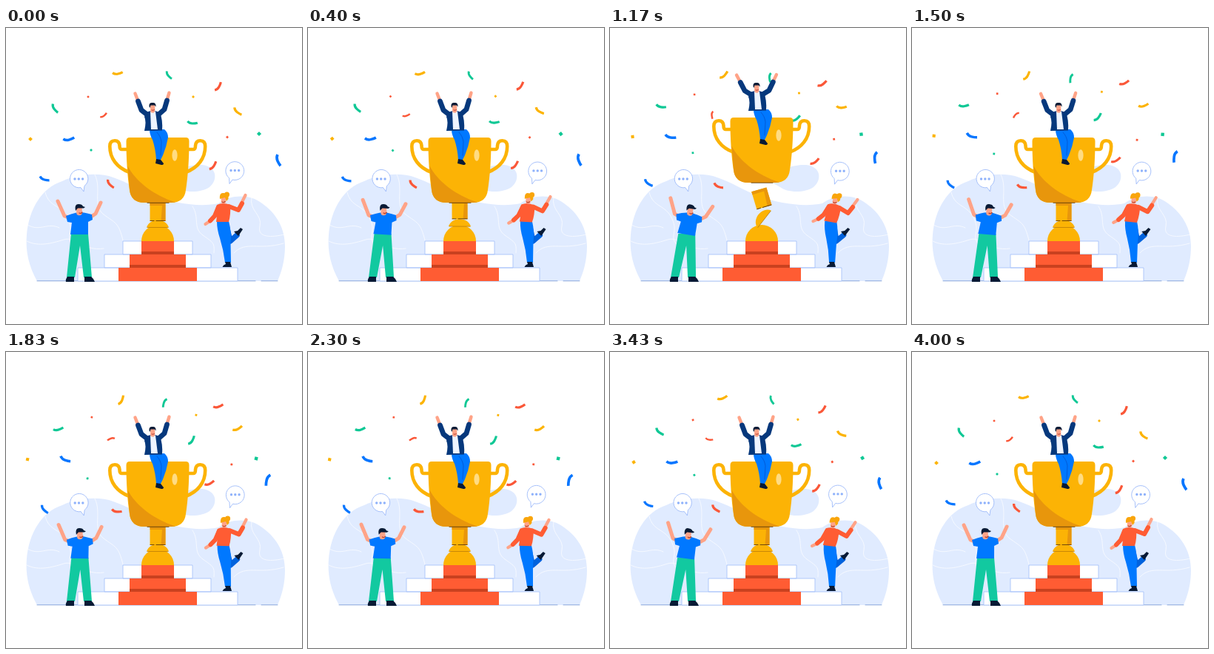
An HTML page for the animation above (4.06 s loop, 400 by 400 pixels).

```html
<!DOCTYPE html>
<html lang="en">
<head>
<meta charset="utf-8">
<title>Winner's cup</title>
<style>
html, body { margin: 0; width: 100%; height: 100%; overflow: hidden; background: #fff; }
svg { display: block; width: 100vw; height: 100vh; }
.line { fill: none; stroke-linecap: round; stroke-linejoin: round; }
.skin { stroke: #ffa387; }
.blue { fill: #0078ff; }
.ink { fill: #081a35; }
.gold { fill: #fcb305; }
.shade { fill: #e8960c; }
.step { fill: #fff; stroke: #a9c3fa; stroke-width: .9; }
.red { fill: #ff5c33; }
.deep { fill: #c9411f; }
</style>
</head>
<body>
<svg viewBox="0 0 400 400">
  <!-- backdrop -->
  <g fill="#e0ebff">
    <path d="M42 342C31 322 26 302 28 279C31 245 48 216 76 207C97 197 126 195 145 202C165 209 178 218 200 227C230 238 264 242 287 237C304 225 329 224 346 237C366 251 377 271 377 295C377 315 372 330 367 342Z"/>
    <path d="M220 205C228 190 250 184 265 185C285 187 287 205 275 215C262 224 238 222 230 215C224 211 217 210 220 205Z"/>
  </g>
  <g class="line" stroke="#fff" stroke-width=".9" opacity=".75">
    <path d="M28 288C44 296 62 291 78 286S104 302 132 298M53 222C58 243 75 238 84 258S78 282 92 294M120 198C130 218 116 240 132 252S152 262 158 287M29 266C46 276 56 262 72 270"/>
    <path d="M332 229C328 247 347 252 343 268S360 283 376 279M308 304C324 287 341 301 375 291M252 241C262 256 252 270 266 280S282 290 281 304"/>
  </g>
  <path class="line" d="M42 341.800H337M345 341.800H367" stroke="#6288cc" stroke-width=".7"/>

  <!-- podium -->
  <path class="step" d="M158 288H252V306H158ZM133 306H277V324H133ZM97 324H313V342H97Z"/>
  <path class="red" d="M183 288H227V306H183ZM167 306H243V324H167ZM152 324H258V342H152Z"/>
  <path class="deep" d="M183 302H227V306H183ZM167 320H243V324H167Z"/>

  <g id="confetti"></g>

  <!-- cup -->
  <path class="gold" d="M183 288A22 22 0 0 1 227 288Z"/>
  <g id="knob">
    <path class="gold" d="M190 269.500C194 256 216 256 220 269.500Z"/>
    <path class="line" d="M191 269.500H219" stroke="#b47408" stroke-width=".7"/>
  </g>
  <g id="neck">
    <path class="gold" d="M194.500 236H215.500V261H194.500Z"/>
    <path class="shade" d="M194.500 236H215.500V240H194.500ZM211 240H215.500V261H209.500Z"/>
    <path class="line" d="M195 260.500H200M203 260.500H215" stroke="#5f3c0a" stroke-width=".9"/>
  </g>
  <g id="cup">
    <g class="line" stroke="#fcb305" stroke-width="4.600">
      <path id="ear" d="M164 164H156Q153.500 164 153.500 159Q153 152.300 147 152.300Q140.300 152.300 140.300 160C140.300 176 150 189 167 195"/>
      <use href="#ear" transform="matrix(-1 0 0 1 409.500 0)"/>
    </g>
    <path class="gold" d="M167 148H243Q247.500 148 247.500 153C247.500 176 246 200 243 219Q241 236 223 236H187Q169 236 167 219C164 200 162.500 176 162.500 153Q162.500 148 167 148Z"/>
    <path class="shade" d="M164.300 186C174 206 199 226 229 235.500L223 236H187Q169 236 167 219Z"/>
    <ellipse cx="228" cy="172" rx="3.600" ry="7.800" fill="#ffdc83"/>
    <path class="line" d="M191 236.300H220" stroke="#5f3c0a" stroke-width=".9"/>

    <!-- winner -->
    <path class="blue" d="M194 137H214Q219 141 219 148Q217 160 212 172L209 178H203Q202 163 198 151Q194 144 194 137Z"/>
    <path class="line" d="M204 141Q209 146 210 154L209 172" stroke="#0459d2" stroke-width=".9"/>
    <path class="ink" d="M203 177L209 178L213 183Q213 185 210 185L202 183Z"/>
    <g id="armL">
      <path class="line skin" d="M179 100L174.500 88.500" stroke-width="4.400"/>
      <path class="line" d="M192 118L183 111L178.500 99" stroke="#06387c" stroke-width="6.800"/>
    </g>
    <g id="armR">
      <path class="line skin" d="M217 99L220.500 87.500" stroke-width="4.400"/>
      <path class="line" d="M206 117L214 110L217.500 98" stroke="#06387c" stroke-width="6.800"/>
    </g>
    <path d="M189 114Q198 110 208 114Q212 124 211 138.500L187 139Q190 126 187 120Z" fill="#06387c"/>
    <path d="M195 113H202L205 137H196Z" fill="#eef4ff"/>
    <path class="line skin" d="M198.200 106V111.500" stroke-width="6.200"/>
    <path class="ink" d="M193.500 106Q193 100.500 198 101Q203 100.500 202.500 106.500L201 104.500H195.500L194.500 108Z"/>
    <path class="line" d="M197 111Q199 112 200.500 110.500" stroke="#b23a2f" stroke-width="1"/>
  </g>

  <!-- left fan -->
  <g id="fanLegs">
    <path d="M88 278H111L116 337H105L100 294L93 337H82Z" fill="#12c9a0"/>
  </g>
  <path class="ink" d="M83 336H92V343H81Q80 340 83 336ZM106 336H115Q119 339 120 343H106Z"/>
  <g id="fanTop">
    <path class="line skin" d="M87 257L79 254L70 234" stroke-width="5"/>
    <path class="line skin" d="M112 257L121 251L128 236" stroke-width="5"/>
    <path class="blue" d="M88 251.500Q99 247.500 110 250.500L116 252L117 259L111 262L111 279H87L89 263L83 262L81 254Z"/>
    <path class="line skin" d="M99 244.500V249.500" stroke-width="7.600"/>
    <path class="ink" d="M94 247Q92 238 98 238Q103 238 104 241L107 242L105 243.500H97Z"/>
    <path class="line" d="M99 250Q101 251.500 103 249" stroke="#b8452f" stroke-width="1.400"/>
  </g>

  <!-- right fan -->
  <g id="palLegs">
    <path class="line" d="M297 264L303 288L312 280" stroke="#0062dd" stroke-width="7.500"/>
    <path class="blue" d="M285 261H301Q305 276 303.500 290L304 317H296Q294 300 289 284Q285 272 285 261Z"/>
    <path class="ink" d="M308 275L314 281L320 272L317 270L313 274Z"/>
  </g>
  <path class="ink" d="M296 316H303L305 323H292.500Q293.500 320 297 319Z"/>
  <g id="palTop">
    <path class="line skin" d="M277 260L269.500 265M317 239L323.500 226" stroke-width="4.200"/>
    <path class="line" d="M287 242L282 254L276 260.500M301 241L314 246L319 237" stroke="#ff5c33" stroke-width="6"/>
    <path class="red" d="M285 239Q293 235 303 239Q304 252 301 262H284Q286 250 283 245Z"/>
    <path class="line skin" d="M294 230.500V234" stroke-width="6.600"/>
    <g fill="#f9a50b">
      <circle cx="298.500" cy="225" r="3.500"/>
      <path d="M289 231Q288 222 294 223Q301 223 300.500 231L298 234L296 229Q292 230 289 231Z"/>
    </g>
    <path class="line" d="M292 235Q294 236.500 296 234.500" stroke="#b8452f" stroke-width="1.200"/>
  </g>

  <!-- speech bubbles -->
  <g id="talkL">
    <path d="M101 215.600L105 221L106 213.400A12.200 12.200 0 1 0 101 215.600Z" fill="#fff" stroke="#9dbafa" stroke-width=".9"/>
    <path class="line" d="M93 204H93.010M98.300 204H98.310M103.600 204H103.610" stroke="#8fb2fb" stroke-width="3.400"/>
  </g>
  <g id="talkR">
    <path d="M306 205L302 210.500L301.500 202.700A12.400 12.400 0 1 1 306 205Z" fill="#fff" stroke="#9dbafa" stroke-width=".9"/>
    <path class="line" d="M304 192.500H304.010M309.300 192.500H309.310M314.600 192.500H314.610" stroke="#8fb2fb" stroke-width="3.400"/>
  </g>
</svg>
<script>
const LOOP = 4060;
const el = id => document.getElementById(id);
const put = (id, transform) => el(id).setAttribute('transform', transform);
const mix = (a, b, k) => a + (b - a) * k;

const gold = '#fcb302', green = '#10c895', red = '#fa5738', blue = '#0876ff';

// colour, start x y angle, end x y angle, size
const ribbons = [
  [gold, 151, 61, -9, 156, 65, -66],
  [green, 220, 64, 52, 214, 69, 112, .9],
  [red, 287, 79, -58, 287, 73, -18],
  [gold, 313, 113, 40, 313, 103, -29],
  [green, 66, 109, 55, 71, 104, -18],
  [blue, 85, 150, -12, 80, 145, 24, 1.1],
  [red, 132, 118, -37, 142, 117.5, 166, .75],
  [green, 252, 128, 4, 251, 119, -60],
  [blue, 368, 179, 70, 353, 173, 108, 1.15],
  [blue, 52, 204, 18, 52, 213, 48],
  [red, 141, 211, 48, 150, 215, 7],
  [red, 280, 186, -54, 275, 177, -25]
];
// colour, start x y, end x y, size
const dots = [
  [red, 111, 93, 116, 88, 1.6],
  [gold, 253, 93, 257, 85, 1.7],
  [gold, 33, 150, 29, 145, 2.5],
  [green, 342, 143, 338, 144, 2.7],
  [red, 299, 147.5, 305, 152, 1.7],
  [green, 115, 165, 110, 171, 1.7]
];

function addPath(d, attrs) {
  const p = document.createElementNS('http://www.w3.org/2000/svg', 'path');
  p.setAttribute('d', d);
  for (const k in attrs) p.setAttribute(k, attrs[k]);
  el('confetti').append(p);
  return p;
}
const strips = ribbons.map(r => addPath('M-6.800-1.500Q-4 1.300 0 1T6.800-.3',
  { fill: 'none', stroke: r[0], 'stroke-width': 3.2 }));
const bits = dots.map(d => addPath('M0-1.150L1.150 0L0 1.150L-1.150 0Z', { fill: d[0] }));

// height of a toss around its peak time
const toss = (t, peak, half, height) =>
  -height * Math.max(0, 1 - ((t - peak) / half) ** 2);

// eased value from [time, value] steps
function track(t, steps) {
  const i = steps.findIndex(s => s[0] > t);
  if (i < 0) return steps[steps.length - 1][1];
  if (!i) return steps[0][1];
  const [t0, a] = steps[i - 1], [t1, b] = steps[i];
  const k = (t - t0) / (t1 - t0);
  return mix(a, b, k * k * (3 - 2 * k));
}

const neckTurn = [[380, 0], [850, -44], [1400, 0]];
const knobTurn = [[380, 0], [730, 33], [1170, -52], [1400, 0]];
const spread = [[800, 0], [1170, 1], [1600, 0]];

// sway of a body: skewed legs, torso turned about the hip
function lean(name, k, hipX, hipY, footY, shift, turn) {
  const slope = -shift * k / (footY - hipY);
  put(name + 'Legs', `matrix(1 0 ${slope} 1 ${-slope * footY} 0)`);
  put(name + 'Top', `translate(${shift * k} 0) rotate(${turn * k} ${hipX} ${hipY})`);
}

function draw(t) {
  const turn = t / LOOP * 2 * Math.PI;
  const drift = (1 - Math.cos(turn)) / 2;
  const sway = (1 - Math.cos(turn * 2)) / 2;

  ribbons.forEach(([, x, y, a, x2, y2, a2, size = 1], i) =>
    strips[i].setAttribute('transform',
      `translate(${mix(x, x2, drift)} ${mix(y, y2, drift)}) rotate(${mix(a, a2, drift)}) scale(${size})`));
  dots.forEach(([, x, y, x2, y2, size], i) =>
    bits[i].setAttribute('transform',
      `translate(${mix(x, x2, drift)} ${mix(y, y2, drift)}) rotate(${60 * drift}) scale(${size})`));

  put('cup', `translate(0 ${toss(t, 900, 490, 39)})`);
  put('neck', `translate(0 ${toss(t, 860, 480, 31.3)}) rotate(${track(t, neckTurn)} 205 249)`);
  put('knob', `translate(0 ${toss(t, 860, 480, 16.2)}) rotate(${track(t, knobTurn)} 205 265)`);
  const open = track(t, spread);
  put('armL', `rotate(${-7 * open} 191 118)`);
  put('armR', `rotate(${9 * open} 206 117)`);

  lean('fan', sway, 99, 278, 338, 4.5, 10);
  lean('pal', sway, 292, 262, 318, 5.5, 10.5);

  put('talkL', `translate(${.7 * Math.sin(turn)} 0)`);
  put('talkR', `translate(${1.6 * Math.sin(turn)} ${.7 * Math.sin(turn)})`);
}

const start = performance.now();
function tick() {
  draw((performance.now() - start) % LOOP);
  requestAnimationFrame(tick);
}
tick();
</script>
</body>
</html>
```
